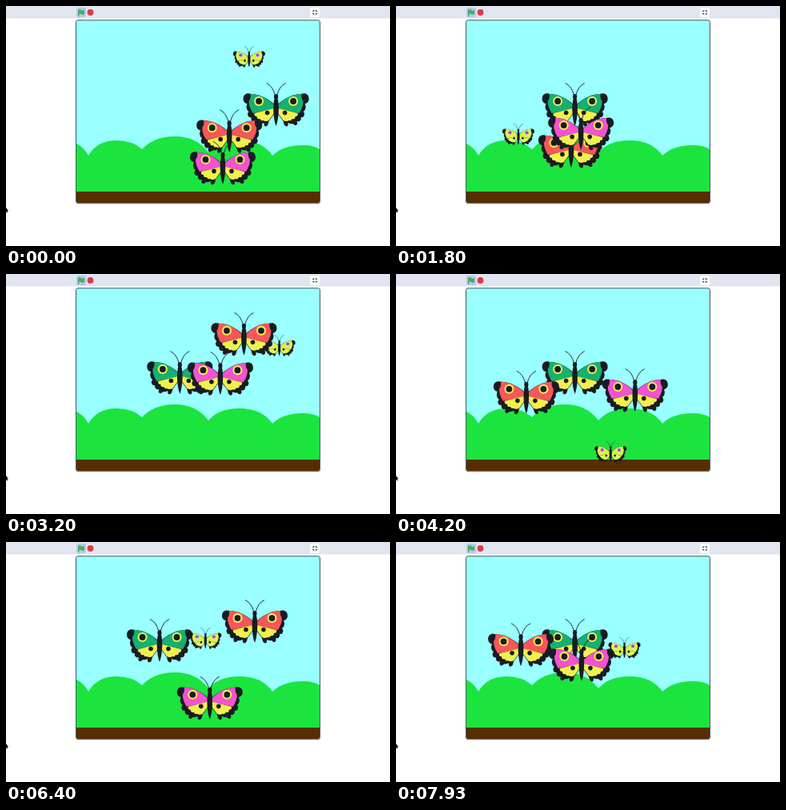
These frames come from a looping animation (480 by 300 pixels, 8000 ms). An HTML page:

```html
<!DOCTYPE html>
<html lang="en">
<head>
<meta charset="utf-8">
<title>Butterflies</title>
<style>
  html, body { margin: 0; width: 100%; height: 100%; overflow: hidden; background: #fff; }
  svg { display: block; width: 480px; height: 300px; }
  .ink { fill: #181c22; }
  .wing { fill: var(--wing); }
  .lower { fill: var(--lower, #f2f04c); }
  .ring { fill: var(--ring, #f2f04c); }
  .eye { fill: var(--eye, #181c22); }
  #green { --wing: #16b070; }
  #red { --wing: #f8565a; }
  #pink { --wing: #f352d0; }
  #yellow { --wing: #d8f44c; --lower: #defa58; --ring: #e6c8d0; --eye: #8a55a8; }
</style>
</head>
<body>
<svg viewBox="0 0 480 300">
  <defs>
    <clipPath id="stage"><rect x="88" y="18" width="304" height="228" rx="2"/></clipPath>
    <g id="half">
      <path class="ink" d="M1-6C11-15 21-20 31-20C37-22 41-19 41-14C41-10 38-8 36-8C38-4 37 0 34 2
        C37 5 35 10 31 9C32 13 29 15 26 14C28 19 24 21 21 17C18 18 16 16 15 16C16 21 12 22 10 18L9 14L1 3Z"/>
      <path class="wing" d="M1-5C11-15 21-20 32-20Q31-15 34-11Q34-4 29 4L1-2Z"/>
      <path class="lower" d="M1-2.500L27 4Q28 8 24 8Q24 12 20 11Q19 14 16 13Q13 15 9 13L1 2Z"/>
      <circle class="ring" cx="21.5" cy="-11" r="6"/>
      <circle class="eye" cx="21.5" cy="-11" r="3.9"/>
      <circle class="ink" cx="11" cy="3.5" r="2.8"/>
      <path d="M1-18Q4-30 12-33.500" fill="none" stroke="#181c22" stroke-width=".9"/>
    </g>
    <g id="butterfly">
      <use href="#half"/>
      <use href="#half" transform="scale(-1 1)"/>
      <path class="ink" d="M0-20C3-20 3-16 2-14C4-8 4 10 0 20C-4 10-4-8-2-14C-3-16-3-20 0-20Z"/>
    </g>
  </defs>

  <rect width="480" height="15.5" fill="#e1e5f0"/>
  <rect x="88" y="2" width="12" height="12" rx="2" fill="#b5c8ec"/>
  <path d="M90.5 5Q92.5 4 94 5.5T97.5 5.5V10Q95.5 11 94 9.8T91 9.5V12.5H90.5Z" fill="#3fb84f" stroke="#2f9a48" stroke-width=".6"/>
  <circle cx="105.5" cy="8" r="3.9" fill="#d83c48"/>
  <rect x="380" y="2" width="12" height="12" rx="2" fill="#fff"/>
  <path d="M383 6.5H384.8V5M387.500 5V6.500H389.300M383 9.500H384.800V11M387.500 11V9.500H389.300" fill="none" stroke="#4d5666" stroke-width="1.1"/>

  <g clip-path="url(#stage)">
    <rect x="88" y="18" width="304" height="228" fill="#99ffff"/>
    <path fill="#1be43f" d="M88 172Q97 176 103 187Q114 168 138 168Q158 168 170 179Q185 163 211 163
      Q238 163 253 183Q266 168 292 168Q320 168 333 187Q346 174 372 174Q384 174 392 179V233H88Z"/>
    <rect x="88" y="232" width="304" height="14" fill="#572d02"/>
    <use id="yellow" href="#butterfly"/>
    <use id="green" href="#butterfly"/>
    <use id="red" href="#butterfly"/>
    <use id="pink" href="#butterfly"/>
  </g>
  <rect x="87.5" y="17.7" width="305" height="229" rx="2.5" fill="none" stroke="#4c585f"/>
  <path d="M0 252L3 256L1.5 256.3L2.2 258L1.2 258.3L0 257Z" fill="#111"/>
</svg>
<script>
const LOOP = 8000, FPS = 15, GLIDE = 1.01;

// Steady glides from stop to stop; lead is how far the first one has already run
const gliders = [
  { id: 'yellow', scale: .49, lead: .81, stops: [[360, 183], [290, 38], [181, 45], [133, 248],
    [348, 88], [265, 231], [127, 104], [227, 109], [388, 215], [232, 94]] },
  { id: 'red', scale: 1, lead: .08, stops: [[286, 160], [200, 200], [222, 179], [344, 62],
    [156, 142], [185, 196], [370, 52], [228, 182], [151, 132]] },
  { id: 'pink', scale: 1, lead: .6, stops: [[290, 191], [258, 211], [215, 212], [258, 74],
    [271, 149], [308, 153], [292, 200], [252, 202], [240, 190], [222, 110]] }
];

function glide({ stops, lead }, t) {
  const run = (t + lead) / GLIDE, leg = Math.floor(run);
  return stops[leg].map((from, axis) => from + (stops[leg + 1][axis] - from) * (run - leg));
}

// Fixed-length steps, bouncing between the stage edges
function patrol(t) {
  const phase = (Math.floor(30.15 * t + .2) + 33.5) % 72;
  return [192 + 6.33 * (25.5 - Math.abs(phase - 36)), 130];
}

function place(id, [x, y], scale) {
  document.getElementById(id).setAttribute('transform', `translate(${x} ${y}) scale(${scale})`);
}

const start = performance.now();
function draw() {
  const t = Math.floor((performance.now() - start) % LOOP * FPS / 1000 + .1) / FPS;
  place('green', patrol(t), 1);
  for (const glider of gliders) place(glider.id, glide(glider, t), glider.scale);
  requestAnimationFrame(draw);
}
draw();
</script>
</body>
</html>
```
